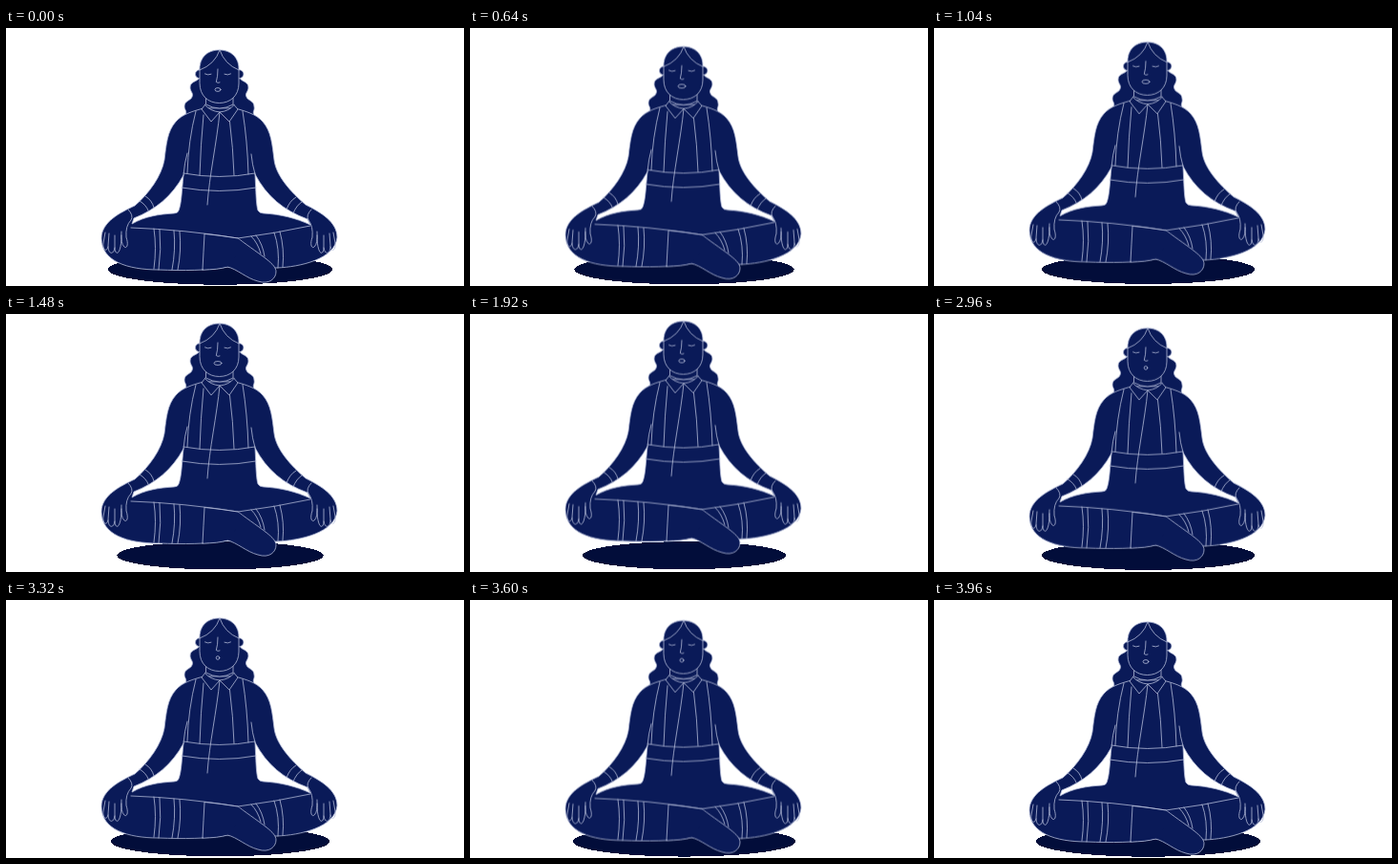
Write an HTML page that moves like this. It is 480x270 px and loops after 4 s.

```html
<!DOCTYPE html>
<html lang="en">
<head>
<meta charset="utf-8">
<title>Breathing</title>
<style>
  html, body { margin: 0; width: 100%; height: 100%; overflow: hidden; background: #fff; }
  svg { display: block; width: 100%; height: 100%; }
  .solid { fill: #0a1a58; stroke: #b4bcd9; stroke-width: .8; }
  .line { fill: none; stroke: #b4bcd9; stroke-width: .8; }
  svg * { stroke-linecap: round; stroke-linejoin: round; }
</style>
</head>
<body>
<svg viewBox="0 0 480 270">
  <ellipse id="shadow" cx="224.5" cy="252.7" rx="117.7" ry="16" fill="#020d3a" shape-rendering="crispEdges"/>
  <g id="figure">
    <!-- hair -->
    <path class="solid" d="M204 50 C202 57 193 55 193 62 C193 67 197 68 195 72 C194 76 187 76 187 82 C187 86 190 86 188 92 L210 98 H240 L260 92 C258 86 261 87 260 82 C260 76 253 76 252 72 C250 68 254 67 254 62 C254 55 245 57 244 50 Z"/>
    <!-- body -->
    <path class="solid" fill-rule="evenodd" d="M207 84 C196 87 185 90 178 98 C169 108 168 122 166 138 C163 155 150 173 135 186
      C120 193 100 203 100 220 C100 244 127 253 160 253 C185 254 212 254 232 250
      L284 251 C308 250 345 242 347 219 C347 203 330 193 314 185 C299 172 283 155 281 138 C279 122 278 108 269 98
      C262 90 251 87 240 84 Z
      M186 154 C184 173 184 183 181 191 Q180 194 176 194 C160 195 146 197 132 205 L134 199 C157 190 174 176 186 154 Z
      M261 153 C262 172 262 184 264 191 Q266 194 270 194 C288 195 304 199 319 206 L316 200 C291 191 273 176 261 153 Z"/>
    <g class="line">
      <!-- arms and cuffs -->
      <path d="M190 131 Q187 141 186 154 M257 132 Q258 143 261 153"/>
      <path d="M140 181 Q147 185 149.500 192 M146 176 Q153 180 155 188 M294 190 Q297 181 304 177 M301 194 Q304 186 310 182"/>
      <!-- shirt -->
      <path d="M199 87 Q191 118 190 152 M207 91 Q204 122 203 154 M224 88 C221 119 213 155 211 185 M234.500 98 Q238 125 239 154 M248 87 Q253 118 254 153"/>
      <path d="M186 152 Q224 159 261 152 M184 167 Q224 174 262 167"/>
      <!-- legs -->
      <path d="M131 209 Q187 211 243 220 Q282 215 319 207"/>
      <path d="M155 210 Q158 230 155 252 M161 211 Q163 231 160 253 M176 212 Q178 232 174 253 M182 213 Q184 233 180 253"/>
      <path d="M257 218 Q264 225 267 236 M262 217 Q269 226 271 239 M281 214 Q287 231 285 251 M287 213 Q292 231 290 250"/>
    </g>
    <!-- foot -->
    <path class="solid" d="M206 253 Q222 253 232 250 C242 252 252 262 264 265 C276 269 283 262 283 255 C283 247 270 240 243 220"/>
    <path d="M208 216 L243 220.5 L251 227 L232 249.5 L207 252.5 Z" fill="#0a1a58"/>
    <path class="line" d="M208 215.500 Q225 217 243 220 M208 216 Q207 234 206 253"/>
    <!-- hands -->
    <g class="line">
      <path d="M128 190 Q134 196 131 201 Q125 207 126 219 C129 228 126 231 124 229 Q120 226 121 213
        M121 217 C121 237 115 239 114 231 V217 M114 230 C113 238 107 237 107 228 L108 215 M107 229 C105 236 101 231 102 225 L104 214"/>
      <path d="M320 190 Q314 196 317 201 Q322 207 321 219 C318 228 321 231 323 229 Q327 226 326 213
        M326 217 C326 237 332 239 333 231 V217 M333 230 C334 238 340 237 340 228 L339 215 M340 229 C342 236 346 231 345 225 L343 214"/>
    </g>
    <!-- neck and collar -->
    <path class="solid" d="M209.500 70 V80 Q224 88 238 80 V70 Z"/>
    <path class="solid" d="M208.500 80.500 L205 85 L215 98 L224 88 Q214 87 208.500 80.500 Z M239 80.500 L243 85 L234 98 L224 88 Q234 87 239 80.500 Z"/>
    <!-- head -->
    <path class="solid" d="M204 43.500 C196.500 43.500 196.500 53 204 53 Z M243 43.500 C251 43.500 251 53 243 53 Z"/>
    <path class="solid" d="M203 45 C202 31 211 23 223.500 23 C236 23 245 31 244 45 V58 C244 71 235 78.500 223.500 78.500 C212 78.500 203 71 203 58 Z"/>
    <g class="line">
      <path d="M224 23 Q219 38 203 44 M224 23 Q229 38 244 44"/>
      <path d="M208.500 48 Q211.500 49.800 215 48.300 M229 48.300 Q232.500 49.800 235.500 48"/>
      <path d="M222 43 Q222 51 220.300 56.500 Q222 58 224 57"/>
      <ellipse id="mouth" cx="222" cy="64.500" rx="3" ry="1.900"/>
    </g>
  </g>
</svg>
<script>
  const LOOP = 4000;
  const sine = "cubic-bezier(.37,0,.63,1)";
  const animations = [];

  function play(id, frames) {
    const options = { duration: LOOP, iterations: Infinity };
    animations.push(document.getElementById(id).animate(frames, options));
  }

  // Rise on the inhale, sink on the exhale.
  function breathe(id, low, high) {
    play(id, [low, high, low].map(pose => ({ ...pose, easing: sine })));
  }

  breathe("figure", { transform: "translateY(0px)" }, { transform: "translateY(-15.5px)" });
  breathe("shadow", { rx: "117.7px", ry: "16px" }, { rx: "106.5px", ry: "14.5px" });

  const mouthSteps = [[0, 3, 1.9], [400, 4, 2], [1700, 4, 2], [2300, 1.8, 1.8], [3500, 1.8, 1.8], [4000, 3, 1.9]];
  play("mouth", mouthSteps.map(([time, rx, ry]) => ({ offset: time / LOOP, rx: rx + "px", ry: ry + "px" })));

  const start = document.timeline.currentTime;
  for (const animation of animations) animation.startTime = start;
</script>
</body>
</html>
```
